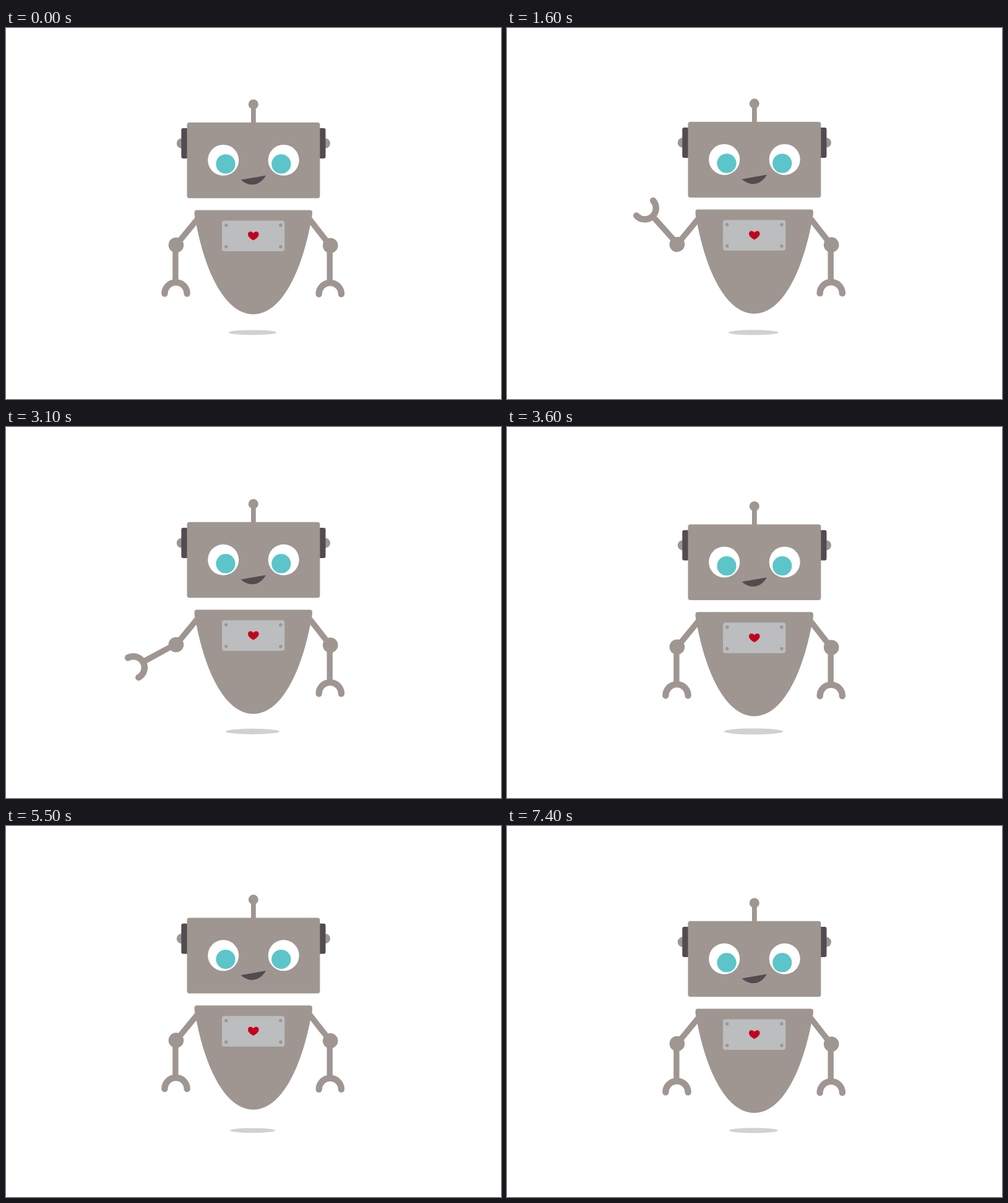
Animation, 800 px wide and 600 px high, one loop 7.5 s. Source, as an HTML page:

```html
<!DOCTYPE html>
<html lang="en">
<head>
<meta charset="utf-8">
<title>Waving robot</title>
<style>
html, body { margin: 0; width: 100%; height: 100%; overflow: hidden; background: #fff; }
svg { display: block; width: 800px; height: 600px; }
.metal { fill: #9f9691; }
.dark { fill: #524c50; }
.limb { fill: none; stroke: #9f9691; stroke-width: 9.4; }
.claw { fill: none; stroke: #9f9691; stroke-width: 10.4; stroke-linecap: round; }
</style>
</head>
<body>
<svg viewBox="0 0 800 600">
  <defs>
    <g id="forearm">
      <path class="limb" d="M-1 0V60"/>
      <path class="claw" d="M-18.5 78.5a18.1 18.1 0 0 1 36.2 0"/>
      <circle class="metal" r="12.3"/>
    </g>
  </defs>
  <ellipse id="shadow" cx="398.5" cy="492.4" fill="#d1d1d1"/>
  <g id="robot">
    <path class="limb" d="M312 306L275 351M488 306L524 352"/>
    <g transform="translate(274.9 351)"><use id="wave" href="#forearm"/></g>
    <use href="#forearm" transform="translate(524.2 351.7)"/>

    <g class="metal">
      <circle cx="399.8" cy="123.4" r="8"/>
      <rect x="396" y="128" width="7.8" height="27"/>
      <circle cx="283.8" cy="186.5" r="8"/>
      <circle cx="516" cy="186.5" r="8"/>
    </g>
    <g class="dark">
      <rect x="283.3" y="162" width="14" height="49" rx="3"/>
      <rect x="502.5" y="162" width="14" height="49" rx="3"/>
    </g>
    <rect class="metal" x="292.5" y="152.8" width="214.9" height="122.4" rx="4"/>
    <g fill="#fff">
      <circle cx="351.2" cy="213.7" r="25"/>
      <circle cx="448.7" cy="213.7" r="25"/>
    </g>
    <g fill="#5bc5ca">
      <circle cx="355" cy="219.9" r="15.6"/>
      <circle cx="444.8" cy="219.9" r="15.6"/>
    </g>
    <path class="dark" d="M379.5 245.5L420 238.4C411 254.5 394 258.5 379.5 245.5Z"/>

    <path class="metal" d="M308.5 294.5H491a4 4 0 0 1 4 4Q495 304 494 307C477.500 400 443 463 399.800 463C356.500 463 322 400 305.500 307Q304.500 304 304.500 298.500a4 4 0 0 1 4-4Z"/>
    <rect x="349" y="311.5" width="101.300" height="49.500" rx="4" fill="#bbbdbf"/>
    <g class="metal">
      <circle cx="355.8" cy="319" r="2.700"/>
      <circle cx="443.9" cy="319" r="2.700"/>
      <circle cx="355.8" cy="353.8" r="2.700"/>
      <circle cx="443.9" cy="353.8" r="2.700"/>
    </g>
    <path fill="#c5001f" d="M399.8 343.400C396 341.500 391 338 391 333.500C391 328.300 397.500 327.800 399.800 332C402 327.800 408.600 328.300 408.600 333.500C408.600 338 403.500 341.500 399.800 343.400Z"/>
  </g>
</svg>
<script>
const LOOP = 7500, STEP = 100;
// [time, value] pairs, joined by sine easing
const shadowKeys = [[-230, 73], [600, 95.5], [2300, 73], [3650, 95.3], [5340, 73], [6700, 95.5], [7770, 73]];
const waveKeys = [[0, 0], [900, 0], [1700, 143.5], [2500, 143.5], [3600, 0], [LOOP, 0]];
const $ = id => document.getElementById(id);

function valueAt(keys, t) {
  const i = keys.findIndex(k => k[0] > t);
  const [t0, a] = keys[i - 1], [t1, b] = keys[i];
  return a + (b - a) * (1 - Math.cos(Math.PI * (t - t0) / (t1 - t0))) / 2;
}

function draw(t) {
  const bob = 5 * Math.sin(2 * Math.PI * t / 3000);
  $('robot').setAttribute('transform', `translate(0 ${bob})`);
  $('wave').setAttribute('transform', `rotate(${valueAt(waveKeys, t)})`);
  const rx = valueAt(shadowKeys, t) / 2;
  $('shadow').setAttribute('rx', rx);
  $('shadow').setAttribute('ry', rx * 0.104);
}

const start = performance.now();
function tick() {
  const t = (performance.now() - start) % LOOP;
  draw(Math.floor(t / STEP) * STEP);
  requestAnimationFrame(tick);
}
tick();
</script>
</body>
</html>
```
